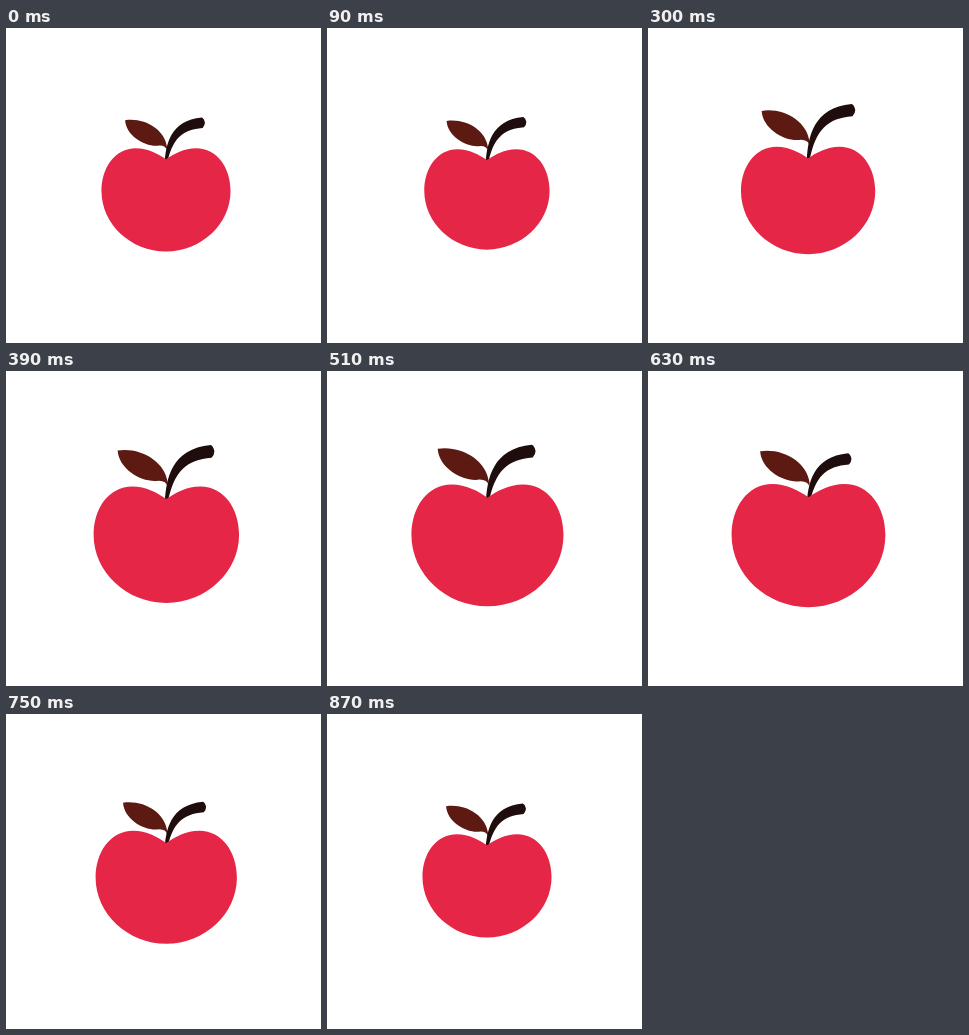
An HTML page for the animation above (900 ms loop, 315 px wide and 315 px high).

```html
<!DOCTYPE html>
<html lang="en">
<head>
<meta charset="utf-8">
<title>Apple</title>
<style>
  html, body { margin: 0; width: 100%; height: 100%; overflow: hidden; background: #fff; }
  svg { display: block; width: 100%; height: 100%; }
</style>
</head>
<body>
<svg viewBox="0 0 315 315">
  <path id="leaf" fill="#5c1a12" d="M119 92C138 89 159 101 161 119L160.8 122Q160 117.5 153.5 117.3C140 119.5 120 108 119 92Z"/>
  <path id="stem" fill="#1f0c0d" d="M158.6 137C159.5 117 164 92.5 196 89.5Q198.2 90.5 199 94.5Q199 97.5 196.7 99.8C176 101.5 166 110.5 160.8 137Z"/>
  <path id="body" fill="#e52646" d="M160 131.5C168 126 178 120.4 190 120.4C211 120.4 224.2 140 224.2 163C224.2 196 195 223.2 160 223.2C125 223.2 95.8 196 95.8 163C95.8 140 109 120.4 130 120.4C142 120.4 152 126 160 131.5Z"/>
</svg>
<script>
const LOOP = 900, CYCLE = 870, STEP = 30, MID = 157.5;
const START = 60, STAGGER = 72, GROWTH = 0.24;

// Order of the wave, with the size of each part at rest
const parts = [["stem", 0.996], ["leaf", 0.983], ["body", 0.966]]
  .map(([id, rest]) => ({ el: document.getElementById(id), rest }));

// cubic-bezier(.25, .1, .25, 1), solved by bisection
function ease(x) {
  let lo = 0, hi = 1, v;
  for (let i = 0; i < 24; i++) {
    v = (lo + hi) / 2;
    if (0.75 * v * (1 - v) + v ** 3 < x) lo = v; else hi = v;
  }
  return 0.3 * v * (1 - v) ** 2 + 3 * v * v * (1 - v) + v ** 3;
}

// Eases up in the first half of the cycle and back down in the second
function pulse(t) {
  const u = 2 * ((t + CYCLE) % CYCLE) / CYCLE;
  return u < 1 ? ease(u) : 1 - ease(u - 1);
}

function draw(ms) {
  const t = Math.floor((ms % LOOP) / STEP) * STEP;
  parts.forEach(({ el, rest }, i) => {
    const s = rest * (1 + GROWTH * pulse(t - START - i * STAGGER));
    const shift = MID * (1 - s);
    el.setAttribute("transform", `matrix(${s} 0 0 ${s} ${shift} ${shift})`);
  });
}

let start;
function tick(now) {
  start ??= now;
  draw(Math.max(0, now - start));
  requestAnimationFrame(tick);
}
draw(0);
requestAnimationFrame(tick);
</script>
</body>
</html>
```
